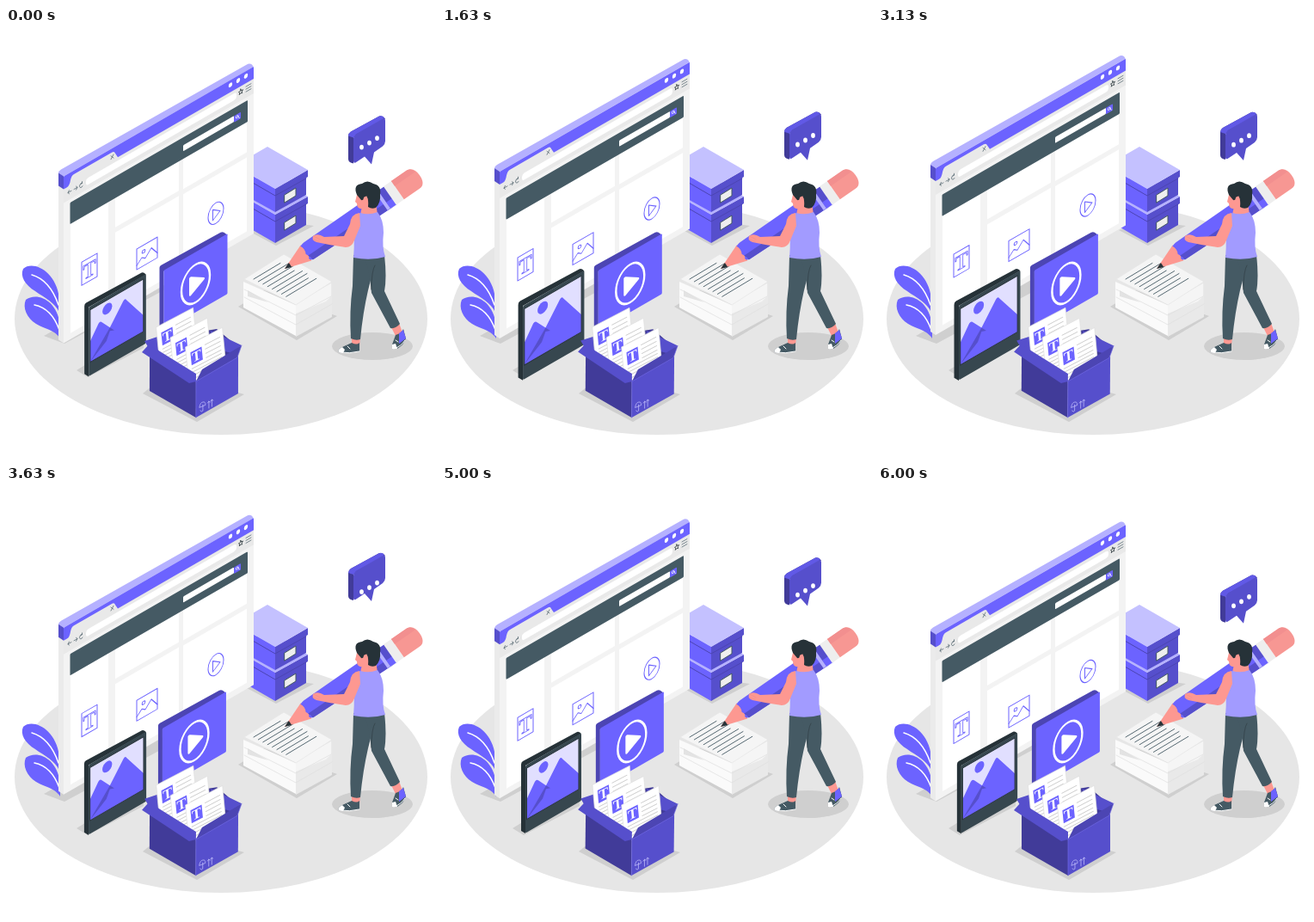
An HTML page that plays this animation: 500 px wide and 500 px high, repeating every 6.04 s.

```html
<!DOCTYPE html>
<html lang="en">
<head>
<meta charset="utf-8">
<title>Content creation</title>
<style>
  html, body { margin: 0; width: 100%; height: 100%; overflow: hidden; background: #fff; }
  svg { display: block; width: 100vw; height: 100vh; }
  text { font-family: "Liberation Serif", "Noto Serif", serif; font-weight: bold; text-anchor: middle; }
  .main { fill: #6c63ff; }
  .side { fill: #564fcc; }
  .dusk { fill: #4c45b3; }
  .deep { fill: #413b99; }
  .pale { fill: #b5b1ff; }
  .dark { fill: #455a64; }
  .ink { fill: #263238; }
  .skin { fill: #fd9891; }
  .white { fill: #fff; }
  .shade { fill: #cfcfcf; }
  .line { fill: none; stroke-linecap: round; stroke-linejoin: round; }
  .violet { stroke: #6c63ff; }
  .light { stroke: #fff; }
  .slate { stroke: #455a64; }
</style>
</head>
<body>
<svg viewBox="0 0 500 500">
  <ellipse cx="250" cy="338" rx="240" ry="135" fill="#e6e6e6"/>
  <g class="shade">
    <path d="M44 358L62 348 200 280 200 296 68 367Z"/>
    <path d="M82 398L95 390 160 366 160 372 95 406Z"/>
    <path d="M159 425L190 400 277 426 222 458Z"/>
    <path d="M270 324L300 305 385 335 338 363Z"/>
    <path d="M280 235L315 224 358 230 314 253Z"/>
    <ellipse cx="426" cy="370" rx="47" ry="16"/>
  </g>

  <!-- plant -->
  <path class="main" d="M62 331C57 319 45 314 34 306 22 299 16 288 20 280 31 270 58 282 62 314Z"/>
  <path class="main" d="M63 361C56 350 46 351 35 344 24 337 19 325 23 316 35 307 59 315 63 345Z"/>
  <path class="line light" stroke-width="1.500" d="M30 287Q51 293 61 322M33 322Q53 326 62 351"/>

  <!-- storage boxes -->
  <path class="main" d="M268 194L313 219V250L268 224Z"/>
  <path class="side" d="M313 219L349 198V229L313 250Z"/>
  <path class="main" d="M266 190L313 217V225L266 198Z"/>
  <path class="side" d="M313 217L351 196V204L313 225Z"/>
  <path class="pale" d="M266 190L304 168 351 196 313 217Z"/>
  <path class="main" d="M268 164L313 189V214L268 189Z"/>
  <path class="side" d="M313 189L349 169V194L313 214Z"/>
  <path class="main" d="M266 160L313 187V195L266 168Z"/>
  <path class="side" d="M313 187L351 165V173L313 195Z"/>
  <path class="line" d="M268 169L313 195 349 175M268 199L313 225 349 205" stroke="#4c45b3"/>
  <path d="M304 138L351 165 313 187 266 160Z" fill="#c4c1ff"/>
  <path class="line slate" d="M324 194L337 186V195L324 203ZM324 226L337 218V227L324 235Z" style="fill:#eee"/>

  <!-- browser window -->
  <g id="browser">
    <path class="pale" d="M61 168Q61 166 64 164L280 42Q283 40 286 42L288 45 67 173Z"/>
    <path d="M61 180L67 184V366L61 362Z" fill="#ebebeb"/>
    <path class="side" d="M61 168L67 172V187L61 183Z"/>
    <g transform="matrix(1 -.577 0 1 67 172)">
      <rect width="221" height="194" fill="#f3f3f3"/>
      <rect class="main" width="221" height="16" rx="1"/>
      <path d="M0 15H4Q7 15 8 9 9 4.500 12 4.500H56Q59 4.500 60 8L63 14H221V31H0Z" fill="#e9e9e9"/>
      <g class="white">
        <ellipse cx="194" cy="5.700" rx="2.200" ry="2.600"/>
        <ellipse cx="203" cy="5.700" rx="2.200" ry="2.600"/>
        <ellipse cx="212" cy="5.700" rx="2.200" ry="2.600"/>
        <rect x="26" y="18" width="175" height="8" rx="3"/>
        <rect x="8" y="59" width="44" height="128"/>
        <rect x="60" y="59" width="74" height="35"/>
        <rect x="60" y="100" width="74" height="87"/>
        <rect x="139" y="59" width="74" height="36"/>
        <rect x="139" y="101" width="74" height="86"/>
      </g>
      <path class="line slate" stroke-width=".6" d="M55 8L58 12M58 8L55 12M5 22H9M6.500 20L5 22 6.500 24M12 22H16M14.500 20L16 22 14.500 24M21.500 20A2 2.500 0 1 0 22 24M21.500 18.500V20.500H20M212 18H218M212 21H218M212 24H218"/>
      <path class="line" stroke="#263238" stroke-width=".7" d="M206 17.500L206.700 19.500H208.500L207.200 21 207.700 23 206 22 204.300 23 204.800 21 203.500 19.500H205.300Z"/>
      <rect class="dark" x="7.500" y="35" width="206.500" height="25" rx="1"/>
      <rect class="white" x="139" y="44" width="59" height="7" rx="1"/>
      <rect class="main" x="198" y="44" width="8" height="7.500" rx="1"/>
      <circle class="line light" cx="201.700" cy="47.200" r="1.400" stroke-width=".7"/>
      <path class="line light" stroke-width=".7" d="M203 48.500L204.500 50"/>
      <g class="line violet" stroke-width="1">
        <rect x="21" y="112" width="18" height="27"/>
        <text transform="translate(30 134) scale(.9 1)" font-size="25" stroke-width=".9">T</text>
        <rect x="85" y="133.500" width="24" height="24"/>
        <path d="M85 153L91 147 95 150 102 142 109 152"/>
        <circle cx="93" cy="141" r="1.800"/>
        <ellipse cx="177" cy="145" rx="9" ry="12"/>
        <path d="M173.500 139V151.500L182 145Z"/>
      </g>
    </g>
  </g>

  <!-- video panel -->
  <g id="video">
    <path class="dusk" d="M179 278Q179 276 181 275L250 237Q252 236 254 237L258 240 184 282 184 351 179 348Z"/>
    <g transform="matrix(1 -.577 0 1 184 281)">
      <rect class="main" width="74" height="70" rx="1"/>
      <ellipse class="line light" cx="37" cy="36.500" rx="16.500" ry="22" stroke-width="2.400"/>
      <path class="white" d="M31 27V46L46 36.500Z" stroke="#fff" stroke-width="3" stroke-linejoin="round"/>
    </g>
  </g>

  <!-- framed picture -->
  <g id="picture">
    <path class="ink" d="M92 324Q92 321 94 320L157 286Q159 285 162 288L97 325V404L92 401Z"/>
    <g transform="matrix(1 -.577 0 1 97 325)">
      <rect width="65" height="78.500" rx="1.500" fill="#37474f"/>
      <rect x="1.500" y="4" width="60.500" height="59.500" fill="#e1dfff"/>
      <ellipse class="main" cx="21" cy="14" rx="5.500" ry="6"/>
      <path class="main" d="M1.500 40L11 25Q13 23 15 26L24 37 39 16Q41 13 43 17L62 45V63.500H1.500Z"/>
      <path class="side" d="M1.500 63L24 37 29 43 24 41 20 50Z"/>
      <path class="line" d="M1.500 4H62V63.500H1.500Z" stroke="#263238"/>
    </g>
  </g>

  <!-- carton with documents -->
  <g id="carton">
    <path class="deep" d="M164 372L182 360 245 350 271 372 222 410Z"/>
    <path class="side" d="M161 364L176 359 180 372 170 379ZM238 352L274 369 262 378 240 372Z"/>
    <g id="sheets"></g>
    <path class="deep" d="M167 378L221 410V453L167 422Z"/>
    <path class="side" d="M221 410L270 381V425L221 453Z"/>
    <path class="side" d="M166 368L221 402V411L213 413 158 377Z"/>
    <path class="dusk" d="M221 411L228 397 274 369 269 383Z"/>
    <path class="line" d="M221 411V453M221 411L269 383 274 369" stroke="#756dea" stroke-width=".6"/>
    <path class="line" d="M225 441Q226 435 229 435 232 434 232 438ZM229 438V445Q228 447 226 445M236 442V434L234.500 436M236 434L237.500 435M239.500 440V432L238 434M239.500 432L241 433" stroke="#c9c6ff" stroke-width=".7"/>
  </g>

  <!-- paper stack -->
  <path d="M276 295L337 322V358L276 325Z" fill="#fafafa"/>
  <path d="M337 322L379 297V336L337 359Z" fill="#e9e9e9"/>
  <path d="M281 305L305 319 281 312Z" fill="#e3e3e3"/>
  <path d="M337 332L372 318 378 312V297L337 320Z" fill="#f5f5f5"/>
  <path class="line" d="M277 304L337 334 378 312M277 313L337 345 379 321" stroke="#dedede" stroke-width=".7"/>
  <path d="M277 292L323 263 379 295 337 322Z" fill="#f5f5f5" stroke="#e5e5e5" stroke-width=".7"/>
  <path id="script" class="line slate" stroke-width=".9"/>

  <!-- pencil -->
  <g transform="translate(324 280) rotate(-34.8)">
    <path class="skin" d="M0 0L31 -12 35 0 31 10Z"/>
    <path class="ink" d="M0 0L8 -3 8 3Z"/>
    <path class="main" d="M30 -11Q34 -12.500 36 -12.500H150V13L34 10Q29 9 30 6 33 4 30 0 33 -6 30 -11Z"/>
    <path class="side" d="M31 3Q33 6 33 10L150 13V4ZM141 -12.500H150V13H141Z"/>
    <rect class="pale" x="137" y="-12.500" width="4" height="25"/>
    <rect x="149" y="-13" width="11" height="26" fill="#eee"/>
    <path d="M160 -13H182Q191 -12 191 0 191 13 182 13H160Z" fill="#f79793"/>
    <path d="M160 -13H182Q188 -12 189 -6H160Z" fill="#f28f8f"/>
  </g>

  <!-- person -->
  <path class="skin" d="M402 359H412L411 370 402 370ZM447 346L457 343 461 354 453 358Z"/>
  <path class="dark" d="M402 366Q408 369 411 366L411 376Q399 379 387 377 385 374 391 371ZM453 357Q460 355 462 350L465 361Q463 368 455 373 448 373 449 368Z"/>
  <path class="main" d="M457 355L462 351 465 361 457 367Z"/>
  <path class="white" d="M387 377Q385 374 391 371L394 374 392 378ZM449 368L453 367 455 373 449 373Z"/>
  <path class="line light" d="M389 377Q399 379 411 376M451 373Q460 370 464 363M397 370L400 373M453 363L456 365"/>
  <path class="dark" d="M404 264H430Q427 284 421 305 415 331 412 362 407 364 401 361 399 330 403 300Z"/>
  <path class="dark" d="M415 264H440Q443 291 440 306L458 344Q453 350 447 349L425 308Q424 292 420 276Z"/>
  <path class="line" d="M429 276Q425 282 425 304" stroke="#37474f"/>
  <path class="skin" d="M415 203L430 203 432 217Q421 223 412 217Z"/>
  <path class="skin" d="M409 190L406 202 408 204Q408 211 415 210L424 206 424 190Z"/>
  <path class="ink" d="M408 194Q403 182 414 181 420 176 427 181 437 183 435 194 436 203 430 209 425 211 421 208 422 200 419 195 416 201 413 200 414 192Z"/>
  <ellipse class="skin" cx="418" cy="200" rx="2.500" ry="4"/>
  <path d="M412 215Q422 218 432 214 439 223 439 238 437 255 441 266 424 271 404 267 406 245 403 229 404 218 412 215Z" fill="#a29bff"/>
  <path class="skin" d="M411 215Q401 216 400 228L393 242 370 243Q362 238 357 242 355 247 361 249L376 252 395 255Q402 255 405 247L412 230Z"/>
  <path class="line" d="M358 242L365 246M357 246L364 248" stroke="#f28f8f" stroke-width=".7"/>

  <!-- speech bubble -->
  <g id="bubble">
    <path class="deep" d="M398 127Q398 124 401 122L434 104Q438 103 441 107L404 129V159Q398 158 398 154Z"/>
    <path class="side" d="M404 130Q404 127 407 125L437 107Q441 105 441 109V133Q441 136 438 139L428 146 425 160 417 151 408 157Q404 160 404 156Z"/>
    <path d="M398 127Q398 124 401 122L434 104Q438 103 440 106L407 125 404 129Z" fill="#6159e6"/>
  </g>
  <g id="dots" class="white">
    <ellipse cx="413.500" cy="139.500" rx="2.400" ry="2.900"/>
    <ellipse cx="422.500" cy="134.500" rx="2.400" ry="2.900"/>
    <ellipse cx="431.500" cy="129" rx="2.400" ry="2.900"/>
  </g>
</svg>
<script>
const el = id => document.getElementById(id);
const pose = (id, transform) => el(id).setAttribute("transform", transform);
const range = n => [...Array(n).keys()];

const sheet = ([x, y]) => `<g transform="matrix(1 -.53 .1 1 ${x} ${y})">
  <rect class="white" width="43" height="46" stroke="#dedede" stroke-width=".6"/>
  <rect class="main" x="5" y="9" width="13" height="15"/>
  <text class="white" x="11.500" y="21.500" font-size="16">T</text>
  <path class="line" stroke="#cfcfcf" d="${range(4).map(i => `M22 ${9 + 5 * i}H39`).join("")}${range(4).map(i => `M5 ${28 + 4 * i}H39`).join("")}"/>
</g>`;
el("sheets").innerHTML = [[174.5, 348], [191, 360], [208.5, 371]].map(sheet).join("");
el("script").setAttribute("d", range(8).map(i =>
  `M${288 + 5.4 * i} ${292 + 2.9 * i}l${i % 3 ? 35 : 31} ${i % 3 ? -21 : -18.6}`).join(""));

// Piecewise-linear value at p through [position, value] stops.
function track(p, stops) {
  const i = stops.findIndex(s => s[0] >= p);
  if (i < 1) return stops[0][1];
  const [a, u] = stops[i - 1], [b, v] = stops[i];
  return u + (v - u) * (p - a) / (b - a);
}
const phase = (t, period) => t % period / period;
const bounce = (t, period) => 1 - Math.abs(1 - 2 * phase(t, period));

const LOOP = 6040, LEAD = 35;
const beat = [[0, 1], [.1, 1.1], [.3, 1], [.4, 1], [.5, 1.1], [.6, 1], [1, 1]];
const sway = [[0, 0], [.25, 1], [.75, -1], [1, 0]];

function draw(now) {
  const t = LEAD + now % LOOP * .995;
  const p = phase(t, 1500), lift = bounce(t, 1500);
  pose("browser", `translate(0 ${.6 - 10 * bounce(t, 6000)})`);
  pose("video", `translate(${-3.5 * bounce(t, 500)} .8)`);
  pose("picture", `translate(127 344.5) scale(${track(p, beat)}) translate(-127 -344.5)`);
  pose("carton", `rotate(${track(p, sway)} 216 390)`);
  pose("bubble", `translate(0 ${-30 * lift})`);
  pose("dots", `translate(0 ${-19 * lift})`);
}
const start = performance.now();
function tick() {
  draw(performance.now() - start);
  requestAnimationFrame(tick);
}
tick();
</script>
</body>
</html>
```
